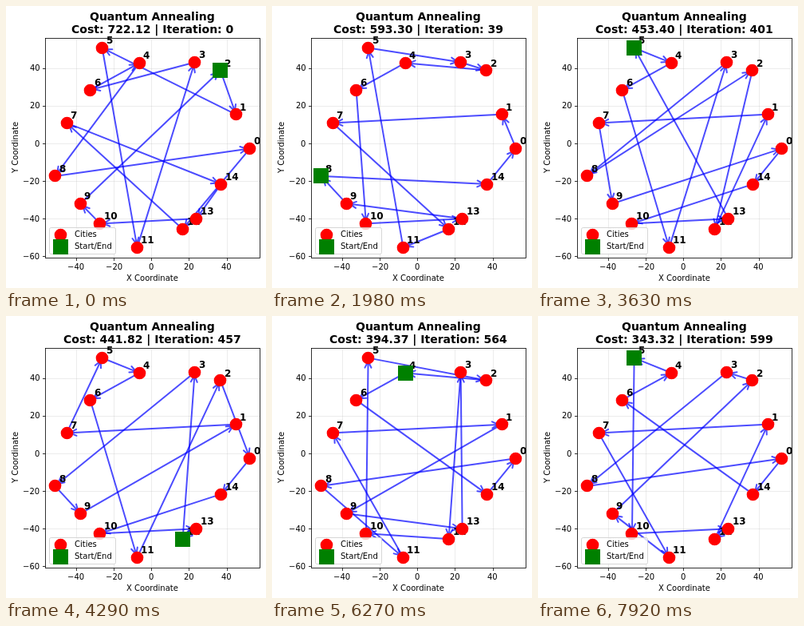
Write an HTML page with a canvas that moves like this. It is 326 px wide and 353 px high and loops after 8000 ms.

```html
<!DOCTYPE html>
<html lang="en">
<head>
<meta charset="utf-8">
<title>Quantum Annealing</title>
<style>
html, body { margin: 0; width: 100%; height: 100%; overflow: hidden; background: #fff; }
canvas { display: block; }
</style>
</head>
<body>
<canvas id="plot" width="326" height="353"></canvas>
<script>
const ctx = document.getElementById('plot').getContext('2d');
const LOOP = 8000, STEP = 330, CITY_COUNT = 15;
const AXES = { left: 49.3, right: 318.2, top: 40, bottom: 314.8 };
const MID_X = (AXES.left + AXES.right) / 2;
const MID_Y = (AXES.top + AXES.bottom) / 2;
const toX = v => 182.3 + v * 2.3565;
const toY = v => 171.7 - v * 2.3544;
const pixel = v => Math.round(v) + 0.5;

// Mersenne Twister, giving doubles in [0, 1).
function randomSource(seed) {
  const size = 624, state = new Uint32Array(size);
  state[0] = seed;
  for (let i = 1; i < size; i++) {
    const last = state[i - 1];
    state[i] = Math.imul(1812433253, last ^ (last >>> 30)) + i;
  }
  let k = 0;
  const next = () => {
    const after = (k + 1) % size;
    let y = (state[k] & 0x80000000) | (state[after] & 0x7fffffff);
    y = state[k] = state[(k + 397) % size] ^ (y >>> 1) ^ (y & 1 ? 0x9908b0df : 0);
    k = after;
    y ^= y >>> 11;
    y ^= (y << 7) & 0x9d2c5680;
    y ^= (y << 15) & 0xefc60000;
    return (y ^ (y >>> 18)) >>> 0;
  };
  return () => ((next() >>> 5) * 2 ** 26 + (next() >>> 6)) / 2 ** 53;
}

// Normally distributed numbers by the polar method, two at a time.
function* gaussians(seed) {
  const random = randomSource(seed);
  while (true) {
    const a = 2 * random() - 1, b = 2 * random() - 1;
    const r2 = a * a + b * b;
    if (r2 >= 1 || r2 === 0) continue;
    const scale = Math.sqrt(-2 * Math.log(r2) / r2);
    yield scale * b;
    yield scale * a;
  }
}

// Cities lie evenly on a circle, shaken by noise.
const noise = gaussians(42);
const scatter = wave => Array.from({ length: CITY_COUNT }, (_, i) =>
  50 * wave(2 * Math.PI * i / CITY_COUNT) + 5 * noise.next().value);
const xs = scatter(Math.cos), ys = scatter(Math.sin);
const cities = xs.map((x, i) => [toX(x), toY(ys[i])]);

// Milestones; the steps between them come from reversing parts of the tour.
const states = [
  { step: 0, cost: 722.12, iteration: 0, tour: [2, 1, 5, 11, 3, 6, 4, 8, 0, 12, 7, 14, 13, 10, 9] },
  { step: 2, cost: 629.74, iteration: 28, tour: [2, 8, 14, 5, 13, 7, 12, 3, 1, 0, 10, 6, 4, 11, 9] },
  { step: 6, cost: 593.30, iteration: 39, tour: [8, 14, 0, 1, 7, 12, 11, 5, 3, 2, 4, 6, 10, 13, 9] },
  { step: 11, cost: 453.40, iteration: 401, tour: [5, 4, 6, 11, 3, 8, 2, 12, 1, 7, 9, 0, 14, 10, 13] },
  { step: 16, cost: 424.45, iteration: 542, tour: [12, 3, 8, 9, 1, 7, 11, 13, 0, 14, 6, 4, 10, 5, 2] },
  { step: 21, cost: 374.31, iteration: 578, tour: [4, 6, 14, 0, 8, 11, 7, 1, 9, 2, 3, 12, 5, 10, 13] },
  { step: 24, cost: 343.32, iteration: 599, tour: [5, 10, 13, 12, 1, 7, 11, 9, 2, 3, 8, 0, 14, 6, 4] }
];

function stateAt(step) {
  const index = states.findLastIndex(s => s.step <= step);
  const from = states[index], to = states[index + 1] ?? from;
  const part = (step - from.step) / (to.step - from.step || 1);
  const mix = key => from[key] + (to[key] - from[key]) * part;
  const tour = [...from.tour];
  for (let i = 0; i < Math.round(part * CITY_COUNT); i++) {
    const end = tour.indexOf(to.tour[i]) + 1;
    tour.splice(i, end - i, ...tour.slice(i, end).reverse());
  }
  return { cost: mix('cost'), iteration: Math.round(mix('iteration')), tour };
}

// Text starts on whole pixels; anchor 0 is left, 0.5 centre, 1 right.
function text(string, x, y, { size = 10, bold = false, anchor = 0 } = {}) {
  ctx.font = `${bold ? 'bold ' : ''}${size}px "DejaVu Sans", sans-serif`;
  ctx.fillStyle = '#000';
  const width = ctx.measureText(string).width;
  ctx.fillText(string, Math.round(x - anchor * width), Math.round(y));
}

function line(x1, y1, x2, y2, color, width) {
  ctx.strokeStyle = color;
  ctx.lineWidth = width;
  ctx.beginPath();
  ctx.moveTo(x1, y1);
  ctx.lineTo(x2, y2);
  ctx.stroke();
}

function disc(x, y) {
  ctx.fillStyle = '#f00';
  ctx.beginPath();
  ctx.arc(Math.floor(x) + 0.5, Math.floor(y) + 0.5, 7.82, 0, Math.PI * 2);
  ctx.fill();
}

function square(x, y) {
  ctx.fillStyle = '#008000';
  ctx.fillRect(Math.floor(x) - 9, Math.floor(y) - 9, 19, 19);
}

function arrow([x1, y1], [x2, y2]) {
  const tip = Math.hypot(x2 - x1, y2 - y1) - 4.2;
  ctx.save();
  ctx.translate(x1, y1);
  ctx.rotate(Math.atan2(y2 - y1, x2 - x1));
  ctx.strokeStyle = 'rgba(0, 0, 255, 0.7)';
  ctx.lineWidth = 2;
  ctx.lineCap = ctx.lineJoin = 'round';
  ctx.beginPath();
  ctx.moveTo(2, 0);
  ctx.lineTo(tip, 0);
  ctx.moveTo(tip - 8, -4);
  ctx.lineTo(tip, 0);
  ctx.lineTo(tip - 8, 4);
  ctx.stroke();
  ctx.restore();
}

function drawGrid() {
  const left = pixel(AXES.left), right = pixel(AXES.right);
  const top = pixel(AXES.top), bottom = pixel(AXES.bottom);
  const grid = 'rgba(176, 176, 176, 0.3)';
  for (let v = -60; v <= 40; v += 20) {
    const label = String(v).replace('-', '\u2212');
    const x = pixel(toX(v)), y = pixel(toY(v));
    line(left, y, right, y, grid, 0.8);
    line(left - 3.5, y, left, y, '#000', 0.8);
    text(label, AXES.left - 7, toY(v) + 3.8, { anchor: 1 });
    if (x < left) continue;
    line(x, top, x, bottom, grid, 0.8);
    line(x, bottom, x, bottom + 3.5, '#000', 0.8);
    text(label, toX(v), 330, { anchor: 0.5 });
  }
}

function drawFrame() {
  const left = pixel(AXES.left), top = pixel(AXES.top);
  ctx.strokeStyle = '#000';
  ctx.lineWidth = 0.8;
  ctx.strokeRect(left, top, pixel(AXES.right) - left, pixel(AXES.bottom) - top);
  text('X Coordinate', MID_X, 344, { anchor: 0.5 });
  ctx.save();
  ctx.translate(15, Math.round(MID_Y));
  ctx.rotate(-Math.PI / 2);
  text('Y Coordinate', 0, 0, { anchor: 0.5 });
  ctx.restore();
}

function drawLegend() {
  ctx.beginPath();
  ctx.roundRect(54.5, 277.5, 83, 33, 2);
  ctx.fillStyle = 'rgba(255, 255, 255, 0.8)';
  ctx.fill();
  ctx.strokeStyle = 'rgba(204, 204, 204, 0.8)';
  ctx.lineWidth = 1;
  ctx.stroke();
  disc(68, 286);
  square(68, 301);
  text('Cities', 86, 289);
  text('Start/End', 86, 304);
}

function draw(step) {
  const { cost, iteration, tour } = stateAt(step);
  ctx.fillStyle = '#fff';
  ctx.fillRect(0, 0, 326, 353);
  drawGrid();
  tour.forEach((city, i) => arrow(cities[city], cities[tour[(i + 1) % CITY_COUNT]]));
  drawFrame();
  cities.forEach(([x, y], i) => text(i, x + 5, y - 5, { size: 12, bold: true }));
  cities.forEach(city => disc(...city));
  square(...cities[tour[0]]);
  drawLegend();

  const title = { size: 14, bold: true, anchor: 0.5 };
  text('Quantum Annealing', MID_X, 18, title);
  text(`Cost: ${cost.toFixed(2)} | Iteration: ${iteration}`, MID_X, 34, title);
}

function play() {
  draw(Math.floor(performance.now() % LOOP / STEP));
  requestAnimationFrame(play);
}
play();
</script>
</body>
</html>
```
